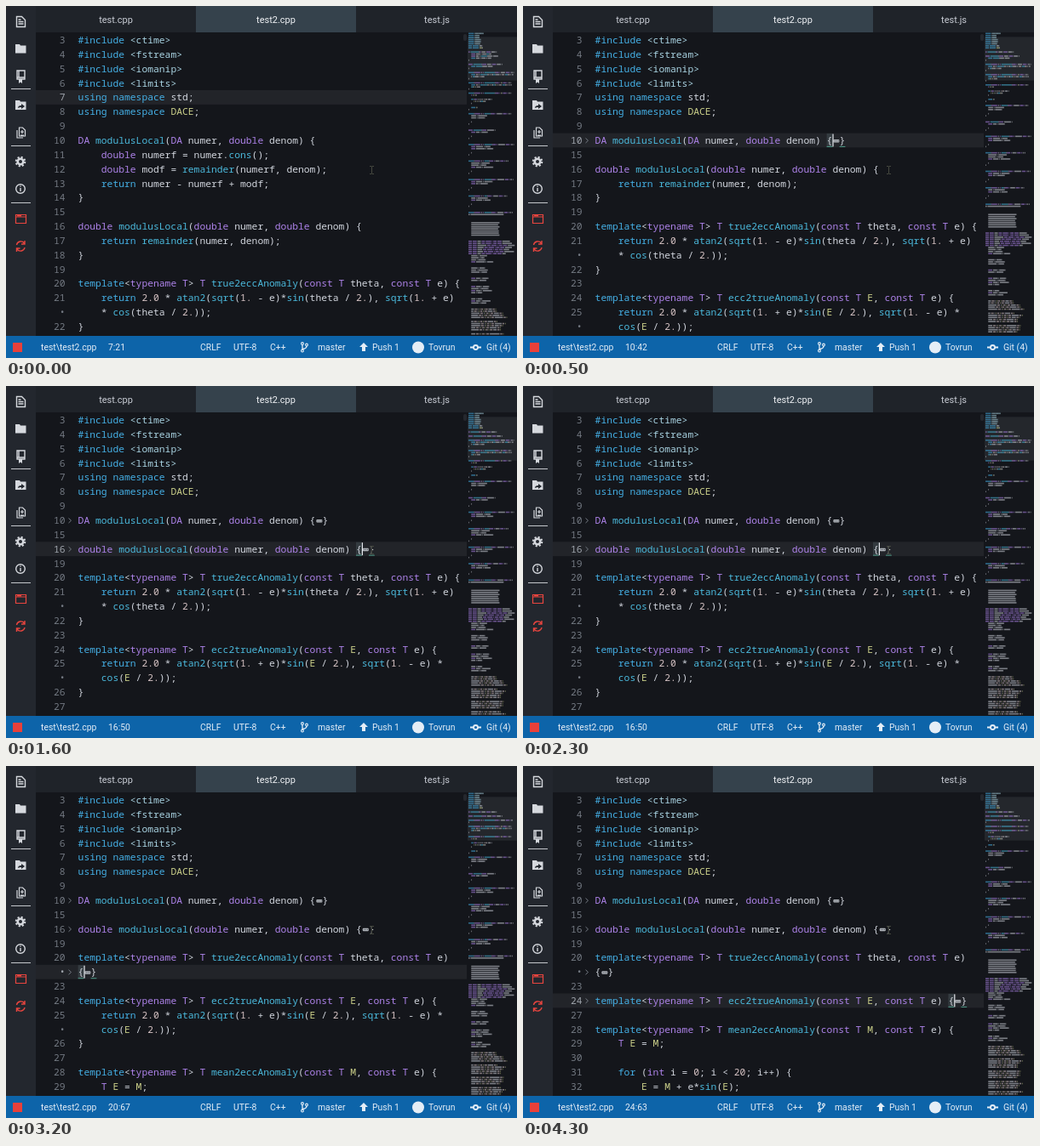
An HTML page that plays this animation: 600 px wide and 414 px high, repeating every 4400 ms.

```html
<!DOCTYPE html>
<html>
<head>
<meta charset="utf-8">
<style>
  html, body { margin: 0; width: 100%; height: 100%; overflow: hidden; background: #14161b; }
  svg { display: block; width: 100%; height: 100%; }
  text { white-space: pre; }
  #code text { font: 11.33px "Noto Sans Mono", "DejaVu Sans Mono", monospace; }
  .ui { font: 10.4px Roboto, sans-serif; fill: #e4edf6; }
  .tab { font: 11px Roboto, sans-serif; fill: #c9cdd5; text-anchor: middle; }
  .line { fill: none; stroke-width: 1.4; stroke: #d6d9de; }
  .red { stroke: #e8453f; }
  .solid { fill: #d6d9de; }
</style>
</head>
<body>
<svg viewBox="0 0 600 414" preserveAspectRatio="none">
  <rect width="600" height="414" fill="#14161b"/>
  <g id="code"></g>
  <g id="map"></g>
  <path d="M427 188.500h2m1 0h2m-2.500 0v9m-2.500 0h2m1 0h2" fill="none" stroke="#45483f"/>
  <rect x="537" y="33" width="4" height="8" rx="2" fill="#25282e"/>

  <rect x="35" width="565" height="31" fill="#1f2329"/>
  <rect x="223" width="188" height="31" fill="#35424c"/>
  <text class="tab" x="129" y="20">test.cpp</text>
  <text class="tab" x="317" y="20" style="fill:#f0f2f5">test2.cpp</text>
  <text class="tab" x="506" y="20">test.js</text>

  <rect width="35" height="388" fill="#23272e"/>
  <path d="M6 97.500h23M6 164.500h23M6 231.500h23" stroke="#c4c7cc"/>
  <g class="line">
    <path d="M12.500 12.500h6l4 4v8h-10zM14.500 16h3m-3 2.500h6m-6 2.500h6"/>
    <path d="M13 76h9v10h-9zm0 8h9M15 76v8"/>
    <path d="M15.500 143h4l3 3v7h-7zM13 146v9h7M19 146v4m-2-2h4m-4 4h4" stroke-width="1.2"/>
    <circle cx="17" cy="183" r="3.300" stroke-width="2.600"/>
    <circle cx="17" cy="183" r="5.300" stroke-width="2" stroke-dasharray="2.080"/>
    <circle cx="17" cy="215" r="5.300"/>
    <path d="M17 214v4m0-6.500v1.300"/>
    <path class="red" stroke-width="1.200" d="M11.500 245.500h12v10h-12zm0 2.500h12M13 246.700h5"/>
    <path class="red" d="M12.500 281a5 5 0 0 1 9-2m.5-3v4h-4M22 284a5 5 0 0 1-9 2m-.5 3v-4h4"/>
  </g>
  <path class="solid" d="M11 45h5l1 1.500h6.500v9H11z"/>
  <path class="solid" d="M15 86h4v5l-2-1.500-2 1.500z"/>
  <path class="solid" d="M11 111h5l1 1.500h6.500v9.500H11z"/>
  <path d="M14 120q0-3 4-3v-2l4 3-4 3v-2q-2 0-4 1z" fill="#23272e"/>

  <rect y="388" width="600" height="26" fill="#0d64a9"/>
  <rect x="8" y="396" width="11" height="11" fill="#e8403a"/>
  <g class="ui">
    <text x="41" y="405">test\test2.cpp</text>
    <text x="120" y="405" id="pos"></text>
    <text x="228" y="405">CRLF</text>
    <text x="267" y="405">UTF-8</text>
    <text x="310" y="405">C++</text>
    <text x="366" y="405">master</text>
    <text x="430" y="405">Push 1</text>
    <text x="496" y="405">Tovrun</text>
    <text x="564" y="405">Git (4)</text>
    <path d="M420 396l5 5h-3v5h-4v-5h-3z"/>
    <circle cx="484" cy="401.500" r="7"/>
  </g>
  <g class="line" style="stroke:#e4edf6">
    <path d="M348 398v6m5-4q0 3-5 3.500" stroke-width="1.300"/>
    <circle cx="348" cy="397" r="1.400" stroke-width="1.100"/>
    <circle cx="348" cy="405.500" r="1.400" stroke-width="1.100"/>
    <circle cx="353" cy="398.500" r="1.400" stroke-width="1.100"/>
    <path d="M545 401.500h4m5 0h4" stroke-width="1.800"/>
    <circle cx="551.500" cy="401.500" r="2.500" stroke-width="1.800"/>
  </g>
</svg>
<script>
const SOURCE = String.raw`#include <dace/dace.h>
#include <cmath>
#include <ctime>
#include <fstream>
#include <iomanip>
#include <limits>
using namespace std;
using namespace DACE;

DA modulusLocal(DA numer, double denom) {
    double numerf = numer.cons();
    double modf = remainder(numerf, denom);
    return numer - numerf + modf;
}

double modulusLocal(double numer, double denom) {
    return remainder(numer, denom);
}

template<typename T> T true2eccAnomaly(const T theta, const T e) {
    return 2.0 * atan2(sqrt(1. - e)*sin(theta / 2.), sqrt(1. + e)
•    * cos(theta / 2.));
}

template<typename T> T ecc2trueAnomaly(const T E, const T e) {
    return 2.0 * atan2(sqrt(1. + e)*sin(E / 2.), sqrt(1. - e) *
•    cos(E / 2.));
}

template<typename T> T mean2eccAnomaly(const T M, const T e) {
    T E = M;

    for (int i = 0; i < 20; i++) {
        E = M + e*sin(E);
    }

    return E;
}
`.split('\n');
const LOOP = 4400, LEFT = 84.6, CHAR = 6.8, TOP = 40, ROW = 16.85, WRAP = 67;
const MAP_TOP = 31.5, MAP_ROW = 2.42, MAP_CHAR = .81;
const FOLDS = [[10, 14], [16, 18], [20, 22], [24, 26]];
const STARTS = [-600, 400, 1600, 2500, 3500];
const COLORS = {
  text: '#d2d6de', flow: '#45b0e6', type: '#ae83ea', call: '#4bb9dc',
  num: '#d6c3c4', header: '#a9d3e2', constant: '#cbd08a'
};
const FLOW = /^(#include|using|namespace|return|for|template)$/;
const TYPE = /^(typename|const|double|int|T|DA)$/;
const $ = id => document.getElementById(id);

// Filler for the part of the file seen only in the overview.
let seed = 7;
const rand = n => (seed = seed * 16807 % 2147483647) % n;
const word = () => 'abcdefghijklmno'.slice(rand(6), 8 + rand(7));
const statement = () => `    ${rand(2) ? 'double ' : ''}${word()} = ${word()};`;
const body = n => Array.from({ length: n }, statement);
const header = () => `template<typename T> T ${word()}(const T ${word()}, const T e) {`;
const SECTIONS = [
  [88, () => [rand(3) ? header() : `double ${word()}(double ${word()}) {`, ...body(1 + rand(3)), '', '    }', '}', '', '']],
  [89, () => ['// ' + 'x'.repeat(48)]],
  [92, () => ['']],
  [99, () => ['    ' + 'x'.repeat(38 + rand(4))]],
  [101, () => ['']],
  [108, () => [`const double ${word()} const typename T const double ${word()}`]],
  [134, () => [...body(2 + rand(3)), '', '']],
  [162, () => [...Array.from({ length: 3 + rand(3) }, () => `    ${word()} 1.25 * E 0.5 M 3.75 ${word()} 2.0 E`), '']]
];
const text = [...SOURCE];
for (const [end, paragraph] of SECTIONS) {
  while (text.length < end) text.push(...paragraph());
  text.length = end;
}

let number = 0;
const lines = text.map(s => {
  const wrapped = s[0] === '•';
  if (!wrapped) number++;
  return { number, label: wrapped ? '•' : number, text: wrapped ? s.slice(1) : s };
});

function tokens(text) {
  const include = text[0] === '#';
  return [...text.matchAll(/[A-Za-z_#]\w*|\d+\.?\d*|[^\s\w]+/g)].map(m => {
    const s = m[0], end = m.index + s.length;
    const kind = FLOW.test(s) ? 'flow' : TYPE.test(s) ? 'type' : /^\d/.test(s) ? 'num'
      : /^[A-Z]+$/.test(s) ? 'constant'
      : text[end] === '(' && /^\w/.test(s) ? 'call' : include ? 'header' : 'text';
    return { s, col: m.index, color: COLORS[kind] };
  });
}

// Screen rows after the first `count` folds are closed.
function layout(count) {
  const rows = [], folds = FOLDS.slice(0, count);
  for (const line of lines) {
    if (folds.some(([a, b]) => line.number > a && line.number <= b)) continue;
    const first = line.label !== '•';
    const folded = first && folds.some(([a]) => a === line.number);
    if (folded && line.text.length + 2 > WRAP) {
      rows.push({ ...line, text: line.text.slice(0, -2) });
      rows.push({ ...line, label: '•', text: '{', folded });
    } else rows.push({ ...line, folded });
  }
  return rows;
}

const rect = (x, y, w, h, fill, extra = '') =>
  `<rect x="${x}" y="${y}" width="${w}" height="${h}" fill="${fill}" ${extra}/>`;
const label = (s, x, y, fill, extra = '') =>
  `<text x="${x}" y="${y}" fill="${fill}" ${extra}>${String(s).replace(/</g, '&lt;')}</text>`;

function render(state) {
  const rows = layout(state);
  const current = state ? FOLDS[state - 1][0] : 7;
  const active = rows.findLastIndex(r => r.number === current);
  let code = rect(35, TOP - 8.4 + (active - 2) * ROW, 506, ROW, '#222429');

  rows.slice(2, 23).forEach((row, i) => {
    const y = TOP + i * ROW, base = y + 4, isActive = i + 2 === active;
    code += label(row.label, 69.5, base, isActive ? '#a0a5ad' : '#737982', 'text-anchor="end"');
    for (const t of tokens(row.text)) code += label(t.s, LEFT + t.col * CHAR, base, t.color);
    const end = LEFT + row.text.length * CHAR;
    if (row.folded) {
      const open = end - CHAR, close = end + 8.2;
      code += `<path d="M73.500 ${y - 2.5}l3 2.800-3 2.800" fill="none" stroke="#747a83"/>`;
      if (isActive) {
        code += rect(open, y - 8, CHAR, ROW - 1, '#343b40');
        code += label('{', open, base, COLORS.text);
        code += rect(open, y + 7, CHAR, 1, '#4d9a88') + rect(close, y + 7, CHAR, 1, '#4d9a88');
      }
      code += rect(end + 1, y - 1, 7, 3.6, '#b4b8be', 'rx="1"');
      code += `<path d="M${end + 2.3} ${y + .8}h5" stroke="#353941" stroke-dasharray="1"/>`;
      code += label('}', close, base, COLORS.text);
    }
    if (isActive) code += rect(end, y - 7.5, 1.2, 15, '#e6e9ee', 'id="cursor"');
  });
  $('code').innerHTML = code;

  let map = rect(542, MAP_TOP + 2 * MAP_ROW, 58, 21.2 * MAP_ROW, '#24272c');
  rows.slice(0, 147).forEach((row, i) => {
    for (const t of tokens(row.text)) {
      map += rect(543 + t.col * MAP_CHAR, MAP_TOP + i * MAP_ROW, t.s.length * MAP_CHAR, 1.6, t.color, 'opacity=".55"');
    }
  });
  $('map').innerHTML = map;
  $('pos').textContent = `${current}:${lines.find(l => l.number === current).text.length + 1}`;
}

let shown = -1;
function tick() {
  const t = performance.now() % LOOP;
  const state = STARTS.findLastIndex(s => t >= s);
  if (state !== shown) render(shown = state);
  const since = t - STARTS[state] - 300;
  $('cursor').style.opacity = since < 0 || since % 800 >= 400 ? 1 : 0;
  requestAnimationFrame(tick);
}
tick();
</script>
</body>
</html>
```
